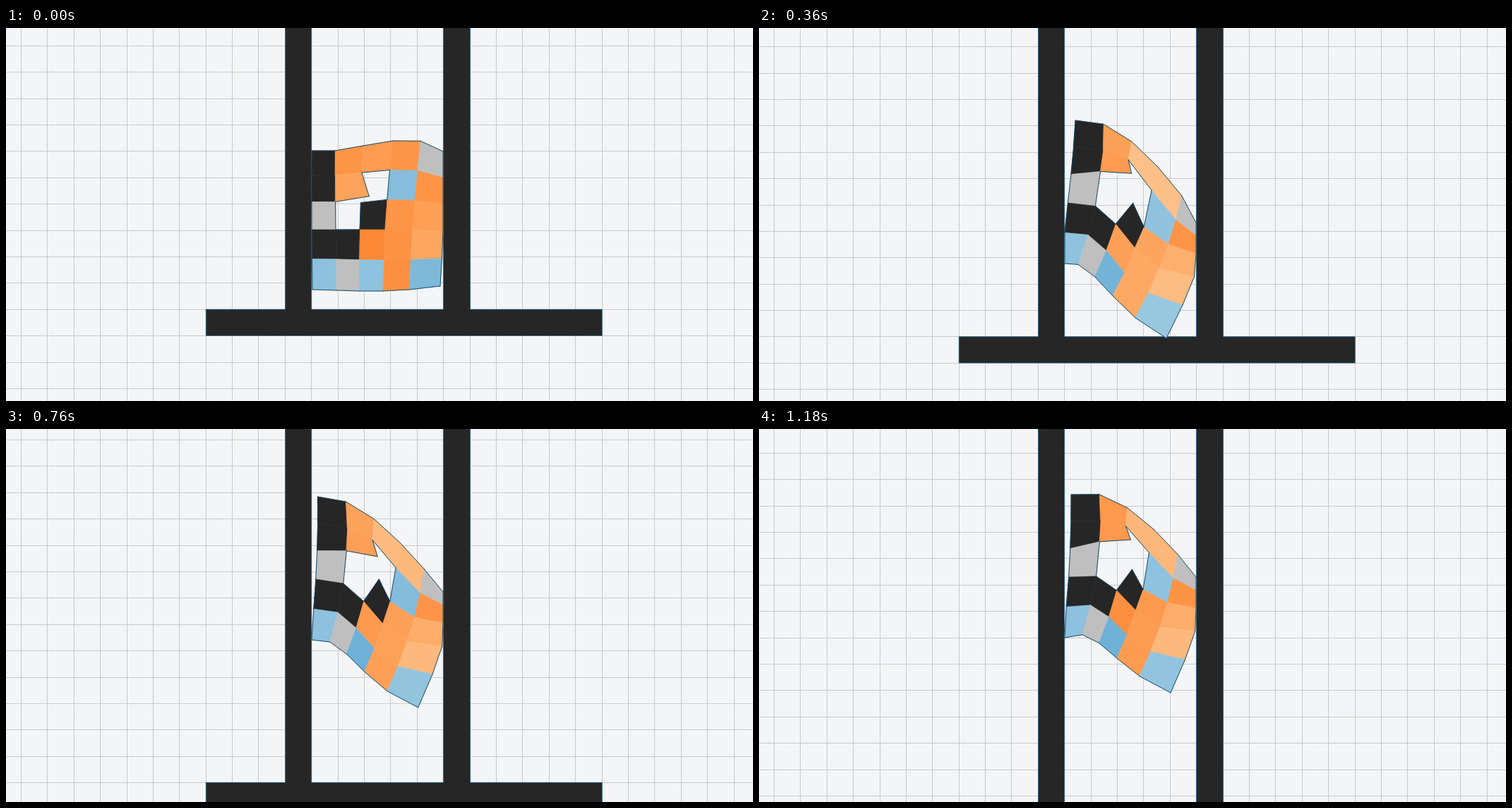
An HTML page with a canvas that plays this animation: 1058x529 px, repeating every 1200 ms.

```html
<!DOCTYPE html>
<html lang="en">
<head>
<meta charset="utf-8">
<title>Soft robot climbing a shaft</title>
<style>
  html, body { margin: 0; width: 100%; height: 100%; overflow: hidden; background: #f4f5f7; }
  canvas { display: block; }
</style>
</head>
<body>
<canvas id="stage" width="1058" height="529"></canvas>
<script>
const W = 1058, H = 529, LOOP = 1200, STEP = 20, CELL = 37.4;
const LEFT = 433, RIGHT = 619;
const BG = '#f4f5f7', GRID = '#c8c9cb', RIGID = '#262626', SOFT = '#bfbfbf';
const RIM = '#164a66', WALL_EDGE = '#1b6a99';
const ctx = document.getElementById('stage').getContext('2d');

// k rigid, g soft, o horizontal muscle, b vertical muscle, . empty
const BODY = ['kooog', 'ko.bo', 'g.koo', 'kkooo', 'bgbob'];
const SIZE = 5, ROW = SIZE + 1, TIP = ROW * ROW;

// Muscle colour by length
const ORANGE = [[31, 249, 122, 38], [37, 253, 141, 60], [46, 253, 174, 107], [53, 253, 192, 137]];
const BLUE = [[37, 107, 174, 214], [47, 158, 202, 225], [52, 168, 208, 229]];

// The body is a smooth patch through handles on these lattice rows and columns.
const NODE_ROWS = [0, 3, 5], NODE_COLS = [0, 1, 3, 5];
const REST = [
  [[433, 174], [466, 174], [548, 160], [619, 175]],
  [[433, 286], [467, 286], [537, 286], [619, 288]],
  [[434, 371], [468, 372], [534, 373], [615, 366]]
];
const BENT = [
  [[440, 92], [480, 99], [557, 158], [619, 229]],
  [[439, 209], [478, 215], [534, 273], [618, 306]],
  [[433, 295], [460, 298], [509, 341], [585, 393]]
];

// time, camera climb, bend, drop, tilt, arch, lean
const KEYS = [
  [0, 0, 0, 0, 0, 0, 0],
  [160, 0, .5, 14, -3, -13, 0],
  [360, 38.7, 1, 39, 8, -5, 8],
  [640, 76.8, 1, 12, -4, 0, 3],
  [900, 134.6, 1, 0, 0, 0, 0],
  [1080, 168, 1, 14, -14, -4, 1],
  [1180, 196, 1, 1, -20, -5, 2]
];

const at = (r, c) => r * ROW + c;
const kind = (r, c) => (BODY[r] || '')[c] || '.';
const mix = (a, b, u) => a + (b - a) * u;
const clamp = (v, lo, hi) => Math.min(hi, Math.max(lo, v));

// Lagrange weights of the nodes at x
const weights = (nodes, x) => nodes.map(a =>
  nodes.reduce((w, b) => a === b ? w : w * (x - b) / (a - b), 1));

// The cell below the hole does not share its first corner with the arm above.
function corners(r, c) {
  const q = [at(r, c), at(r, c + 1), at(r + 1, c + 1), at(r + 1, c)];
  if (r === 2 && c === 2) q[0] = TIP;
  return q;
}

const cells = [], rim = [];
for (let r = 0; r < SIZE; r++) for (let c = 0; c < SIZE; c++) {
  if (kind(r, c) === '.') continue;
  const q = corners(r, c);
  cells.push({ type: kind(r, c), q });
  [[-1, 0], [0, 1], [1, 0], [0, -1]].forEach(([dr, dc], i) => {
    if (kind(r + dr, c + dc) === '.') rim.push([q[i], q[(i + 1) % 4]]);
  });
}

// Smooth curve through the keys
function sample(t) {
  let i = 0;
  while (i < KEYS.length - 2 && t >= KEYS[i + 1][0]) i++;
  const a = KEYS[i], b = KEYS[i + 1];
  const before = KEYS[Math.max(0, i - 1)], after = KEYS[Math.min(KEYS.length - 1, i + 2)];
  const d = b[0] - a[0], u = Math.min(1, (t - a[0]) / d), w = 1 - u;
  return a.slice(1).map((_, n) => {
    const k = n + 1;
    const va = (b[k] - before[k]) / (b[0] - before[0]);
    const vb = (after[k] - a[k]) / (after[0] - a[0]);
    return a[k] * w * w * (1 + 2 * u) + b[k] * u * u * (3 - 2 * u) + d * u * w * (va * w - vb * u);
  });
}

function lattice([, bend, drop, tilt, arch, lean]) {
  const p = [];
  for (let r = 0; r < ROW; r++) {
    const wr = weights(NODE_ROWS, r);
    for (let c = 0; c < ROW; c++) {
      const wc = weights(NODE_COLS, c), u = c / SIZE;
      const blend = axis => wr.reduce((sum, a, i) => sum + wc.reduce((s, b, j) =>
        s + a * b * mix(REST[i][j][axis], BENT[i][j][axis], bend), 0), 0);
      p.push([
        blend(0) + lean * (1 - 2 * r / SIZE),
        blend(1) + drop + tilt * u + arch * 4 * u * (1 - u)
      ]);
    }
  }
  // Bending opens the hole: the arm lifts away from the tip below it.
  const gap = 20 * bend - 1.5 * arch;
  const push = (i, dx, dy) => { p[i][0] += dx; p[i][1] += dy; };
  p[TIP] = [...p[at(2, 2)]];
  push(TIP, 14 * bend, 3 + gap / 5);
  push(at(2, 2), 12, -6 - gap);
  push(at(1, 2), 0, -gap / 2);
  push(at(1, 3), 0, -gap / 4);
  push(at(2, 1), 0, -gap / 3);
  push(at(2, 3), 0, gap / 4);
  return p.map(([x, y]) => [clamp(x, LEFT, RIGHT), y]);
}

function shade(stops, v) {
  let i = 0;
  while (i < stops.length - 2 && v > stops[i + 1][0]) i++;
  const a = stops[i], b = stops[i + 1];
  const u = clamp((v - a[0]) / (b[0] - a[0]), 0, 1);
  return `rgb(${[1, 2, 3].map(n => Math.round(mix(a[n], b[n], u)))})`;
}

function colour({ type, q }, p) {
  const len = (i, j) => Math.hypot(p[q[i]][0] - p[q[j]][0], p[q[i]][1] - p[q[j]][1]);
  if (type === 'k') return RIGID;
  if (type === 'g') return SOFT;
  return type === 'o'
    ? shade(ORANGE, (len(0, 1) + len(3, 2)) / 2)
    : shade(BLUE, (len(0, 3) + len(1, 2)) / 2);
}

function trace(pts, closed = true) {
  ctx.beginPath();
  pts.forEach(([x, y]) => ctx.lineTo(x, y));
  if (closed) ctx.closePath();
}

function drawGrid(climb) {
  ctx.fillStyle = GRID;
  for (let x = 21.4; x < W; x += CELL) ctx.fillRect(Math.floor(x), 0, 1, H);
  const first = ((25.3 + climb) % CELL + CELL) % CELL;
  for (let y = first; y < H; y += CELL) ctx.fillRect(0, Math.floor(y), W, 1);
}

function drawShaft(climb) {
  const top = 399 + climb, end = top + CELL;
  trace([[395.3, -9], [432.7, -9], [432.7, top], [619.4, top], [619.4, -9], [657.5, -9],
    [657.5, top], [844.3, top], [844.3, end], [283.2, end], [283.2, top], [395.3, top]]);
  ctx.fillStyle = RIGID;
  ctx.fill();
  ctx.strokeStyle = WALL_EDGE;
  ctx.lineWidth = .7;
  ctx.stroke();
}

function drawRobot(p) {
  ctx.lineWidth = .6;
  for (const cell of cells) {
    trace(cell.q.map(i => p[i]));
    ctx.fillStyle = ctx.strokeStyle = colour(cell, p);
    ctx.fill();
    ctx.stroke();
  }
  ctx.strokeStyle = RIM;
  ctx.lineWidth = 1;
  for (const [i, j] of rim) {
    trace([p[i], p[j]], false);
    ctx.stroke();
  }
}

function draw(now) {
  const state = sample(Math.floor((now % LOOP) / STEP) * STEP);
  ctx.fillStyle = BG;
  ctx.fillRect(0, 0, W, H);
  drawGrid(state[0]);
  drawShaft(state[0]);
  drawRobot(lattice(state));
}

ctx.lineJoin = ctx.lineCap = 'round';
let start;
function tick(now) {
  start ??= now;
  draw(Math.max(0, now - start));
  requestAnimationFrame(tick);
}
draw(0);
requestAnimationFrame(tick);
</script>
</body>
</html>
```
